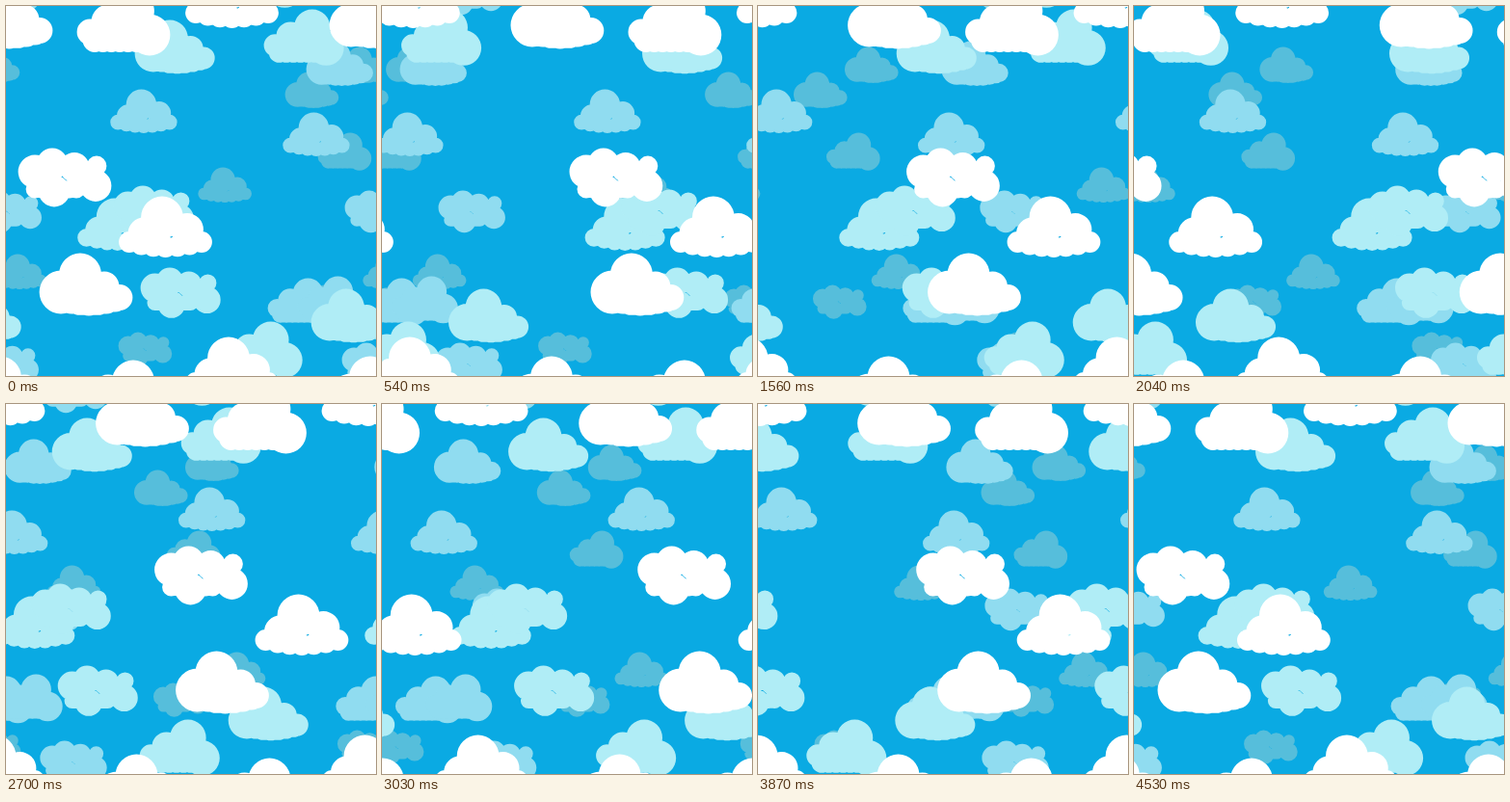
Animation, 384 px wide and 384 px high, one loop 4.56 s. Source, as an HTML page with a canvas:

```html
<!DOCTYPE html>
<html lang="en">
<head>
<meta charset="utf-8">
<title>Drifting clouds</title>
<style>
  html, body { margin: 0; width: 100%; height: 100%; overflow: hidden; background: #0aaae3; }
  canvas { display: block; width: 384px; height: 384px; }
</style>
</head>
<body>
<canvas id="sky" width="384" height="384"></canvas>
<script>
const SIZE = 384, STEP = 30, STEPS = 152, BASE_PUFFS = 7;
const ctx = document.getElementById('sky').getContext('2d');
const puff = (x, y, r) => ({ x, y, r });

// A sagging row of equal puffs that forms the underside of a cloud.
function base(left, right, y, r, sag = 0) {
  return Array.from({ length: BASE_PUFFS }, (_, i) => {
    const t = i / (BASE_PUFFS - 1);
    return puff(left + (right - left) * t, y + sag * Math.sin(Math.PI * t), r);
  });
}

// Cloud shapes, 96 units wide: an underside and a few crown puffs.
const tall = [...base(10, 85, 47, 10.5, 5),
  puff(25, 38, 16), puff(44, 21.5, 21.5), puff(70, 34, 16.5)];
const heavy = [...base(24, 78, 46, 14, 4),
  puff(22, 40, 22), puff(42, 21.5, 21.5), puff(67, 34, 15), puff(83, 45.5, 13)];
const loose = [...base(17, 60, 42, 9),
  puff(17, 24, 17), puff(35, 16, 16), puff(58, 19.5, 15), puff(81, 18, 10),
  puff(80, 38.5, 16), puff(37, 44, 16)];
const lumpy = [...base(18, 70, 51.5, 12),
  puff(13, 43, 13), puff(32, 32, 17), puff(58, 21.5, 21.5), puff(75, 46, 21)];

const at = (shape, x, y) => ({ shape, x, y });

// Far to near: every nearer layer is larger and crosses the stage once more per loop.
const layers = [
  ['#56bedb',
    at(tall, 200, 168), at(tall, 371, 258), at(heavy, 290, 69), at(heavy, 343, 43),
    at(lumpy, 324, 132), at(loose, 117, 339), at(loose, 310, 290)],
  ['#90dcf0',
    at(tall, 109, 87), at(tall, 288, 111), at(heavy, 312, 37), at(loose, 352, 192),
    at(lumpy, 272, 283), at(lumpy, 303, 281), at(loose, 349, 350)],
  ['#b0edf6',
    at(heavy, 134, 15), at(lumpy, 268, 4), at(tall, 75, 200), at(loose, 112, 187),
    at(loose, 140, 272), at(heavy, 317, 294), at(lumpy, 225, 328)],
  ['#ffffff',
    at(tall, 118, 198), at(tall, 187, 344), at(heavy, 35, 257), at(heavy, 336, 364),
    at(loose, 13, 148), at(lumpy, 74, 368)]
].map(([color, ...clouds], depth) =>
  ({ color, clouds, scale: (depth + 4) / 7, laps: depth + 1 }));

function drawCloud(shape, left, top, scale) {
  ctx.beginPath();
  for (const { x, y, r } of shape) {
    const cx = left + x * scale, cy = top + y * scale, radius = r * scale + 0.4;
    ctx.moveTo(cx + radius, cy);
    ctx.arc(cx, cy, radius, 0, 2 * Math.PI);
  }
  ctx.fill();
}

function drawLayer({ color, clouds, scale, laps }, progress) {
  ctx.fillStyle = color;
  for (const { shape, x, y } of clouds) {
    const left = (x + progress * laps * SIZE) % SIZE;
    for (const dx of [0, -SIZE])
      for (const dy of [0, -SIZE]) drawCloud(shape, left + dx, y + dy, scale);
  }
}

const start = performance.now();

function render() {
  const step = Math.floor((performance.now() - start) / STEP) % STEPS;
  ctx.fillStyle = '#0aaae3';
  ctx.fillRect(0, 0, SIZE, SIZE);
  layers.forEach(layer => drawLayer(layer, step / STEPS));
  requestAnimationFrame(render);
}
render();
</script>
</body>
</html>
```
